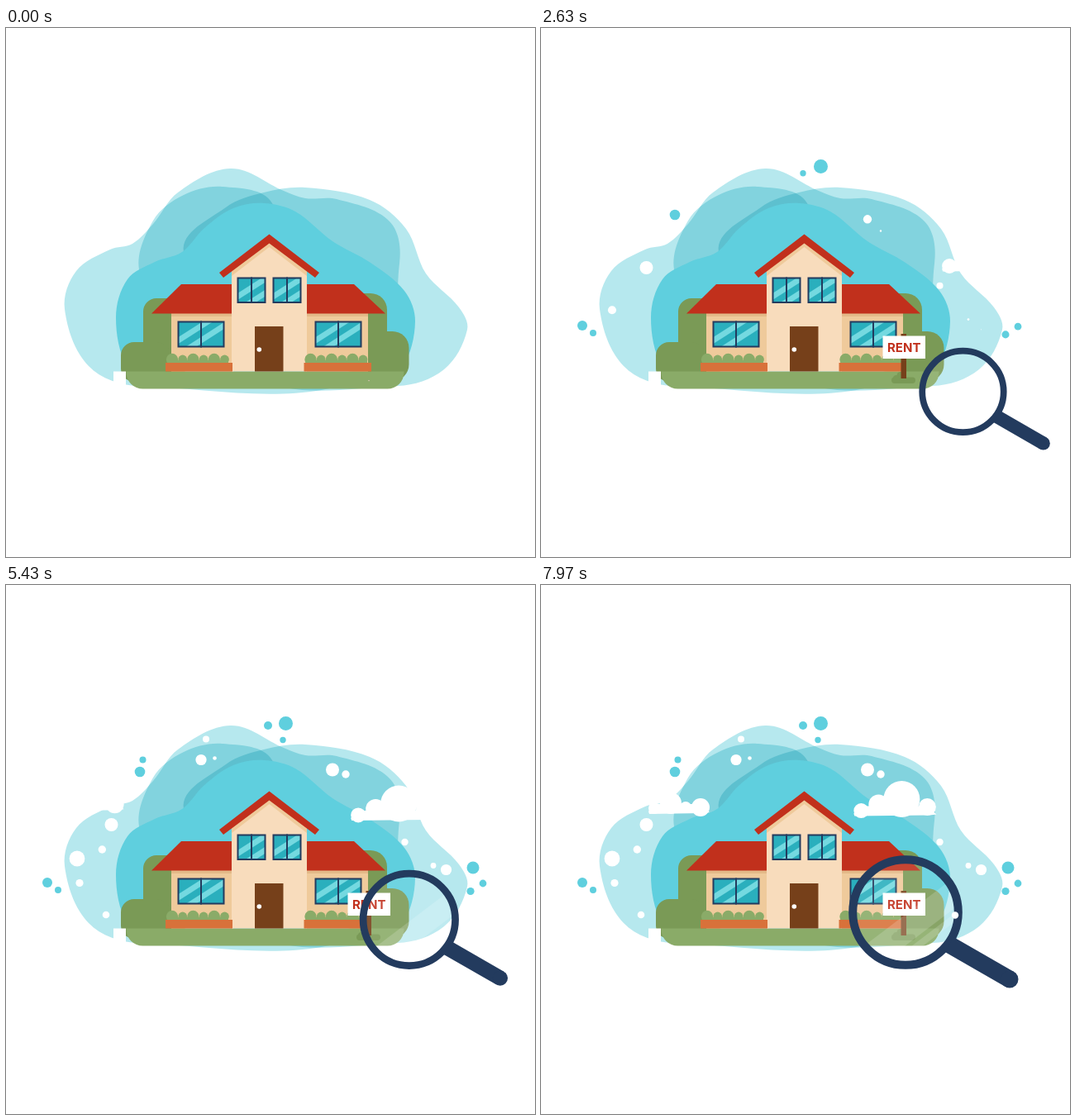
These frames come from a looping animation (640 px wide and 640 px high, 8 s). An HTML page with a canvas:

```html
<!DOCTYPE html>
<html lang="en">
<head>
<meta charset="utf-8">
<title>House for rent</title>
<style>
  html, body { margin: 0; width: 100%; height: 100%; overflow: hidden; background: #fff; }
  canvas { display: block; width: 100%; height: 100%; }
</style>
</head>
<body>
<canvas id="stage" width="640" height="640"></canvas>
<script>
const ctx = document.getElementById('stage').getContext('2d');
const LOOP = 8000;
const CYAN = '#5fcfde', MIST = '#b6e8ee', RED = '#c1301c', NAVY = '#233b5e',
      BUSH = '#7a9a56', GRASS = '#8aab68', WALL = '#f8dcbc', SHADE = '#efca9b',
      BROWN = '#76401a';

const span = (t, from, to) => Math.max(0, Math.min(1, (t - from) / (to - from)));
const smooth = u => u * u * (3 - 2 * u);
const easeOut = u => 1 - (1 - u) ** 3;
const mix = (a, b, u) => a + (b - a) * u;

function rect(color, x, y, x2, y2) {
  ctx.fillStyle = color;
  ctx.fillRect(x, y, x2 - x, y2 - y);
}

function poly(color, ...p) {
  ctx.fillStyle = color;
  ctx.beginPath();
  for (let i = 0; i < p.length; i += 2) ctx.lineTo(p[i], p[i + 1]);
  ctx.fill();
}

function disc(color, x, y, r) {
  ctx.fillStyle = color;
  ctx.beginPath();
  ctx.arc(x, y, r, 0, Math.PI * 2);
  ctx.fill();
}

function pill(color, x, y, w, h, r) {
  ctx.fillStyle = color;
  ctx.beginPath();
  ctx.roundRect(x, y, w, h, r);
  ctx.fill();
}

function clipRect(x, y, w, h) {
  ctx.beginPath();
  ctx.rect(x, y, w, h);
  ctx.clip();
}

// Closed smooth curve; handles are a third of each segment long.
function blob(...p) {
  const n = p.length / 2, path = new Path2D();
  const at = i => [p[2 * ((i + n) % n)], p[2 * ((i + n) % n) + 1]];
  const heading = i => {
    const a = at(i - 1), b = at(i + 1);
    return Math.atan2(b[1] - a[1], b[0] - a[0]);
  };
  path.moveTo(p[0], p[1]);
  for (let i = 0; i < n; i++) {
    const [x, y] = at(i), [x2, y2] = at(i + 1);
    const d = Math.hypot(x2 - x, y2 - y) / 3, a = heading(i), b = heading(i + 1);
    path.bezierCurveTo(x + d * Math.cos(a), y + d * Math.sin(a),
      x2 - d * Math.cos(b), y2 - d * Math.sin(b), x2, y2);
  }
  return path;
}

const mists = [
  blob(71, 340, 85, 294, 126, 268, 153, 261, 178, 237, 208, 199, 272, 170, 336, 197,
    362, 206, 400, 207, 464, 234, 476, 285, 440, 420, 160, 433, 100, 409),
  blob(215, 271, 266, 217, 312, 199, 362, 193, 440, 208, 484, 243, 508, 297, 548, 338,
    558, 365, 530, 413, 474, 433, 300, 420),
  blob(162, 296, 178, 233, 215, 202, 262, 192, 322, 212, 340, 330, 210, 350)
];
const hill = blob(133, 350, 147, 304, 180, 283, 213, 271, 240, 242, 275, 218, 312, 212,
  350, 222, 395, 258, 441, 284, 482, 318, 495, 355, 480, 410, 450, 428, 180, 428, 147, 410);

function backdrop() {
  ctx.globalCompositeOperation = 'multiply';
  ctx.fillStyle = MIST;
  mists.forEach(m => ctx.fill(m));
  ctx.globalCompositeOperation = 'source-over';
  ctx.fillStyle = CYAN;
  ctx.fill(hill);
}

// Puffs are [x, y, radius] from the lower left corner.
function cloud(x, y, width, puffs) {
  const [first, last] = [puffs[0], puffs[puffs.length - 1]];
  ctx.save();
  ctx.translate(x, y);
  puffs.forEach(p => disc('#fff', ...p));
  poly('#fff', 0, -3, first[0], -12, last[0], -12, width, -2, width - 8, -1, 1, 0);
  ctx.restore();
}

function clouds(t) {
  const right = 130 * (1 - smooth(span(t, 600, 8200)));
  const left = -112 * (1 - smooth(span(t, 3200, 7970)));
  cloud(378 + right, 279.5 + right * 0.14, 100,
    [[9, -6.5, 9], [30, -14, 12], [58, -20.5, 22], [89, -11, 10.5]]);
  cloud(130 + left, 277 + left * 0.06, 74,
    [[7, -7, 7], [27, -13, 13], [45, -8, 7], [63, -8, 11]]);
}

function greenery() {
  pill(BUSH, 166, 327, 60, 90, 16);
  pill(BUSH, 139, 380, 60, 48, 16);
  pill(BUSH, 400, 321, 61, 95, 20);
  pill(BUSH, 420, 367, 67.5, 60, 20);
  rect('#fff', 130, 415.5, 145, 436);
  pill(GRASS, 145.5, 415.5, 336, 21, [0, 0, 20, 20]);
}

function pane(x, y, w, h) {
  ctx.save();
  clipRect(x, y, w, h);
  rect('#2aafbd', x, y, x + w, y + h);
  for (const k of [0.62, 1.2]) {
    const low = y + h * k, high = low - w * 0.64;
    poly('#74d9e0', x, low, x + w, high, x + w, high + 8, x, low + 8);
  }
  ctx.restore();
  ctx.strokeStyle = NAVY;
  ctx.lineWidth = 2;
  ctx.strokeRect(x, y, w / 2, h);
  ctx.strokeRect(x + w / 2, y, w / 2, h);
}

function planter(x, x2) {
  ctx.save();
  clipRect(x, 380, x2 - x, 26);
  for (let i = 0; i < 6; i++) disc(GRASS, x + 8 + i * 12.7, 401, i % 2 ? 5.4 : 7.2);
  rect(GRASS, x + 2, 402, x2 - 5, 406);
  ctx.restore();
  rect('#d8713a', x, 405, x2, 415.5);
}

function house() {
  for (const x of [200, 363]) {
    rect(SHADE, x, 340, x + 75, 415.5);
    rect('#e3b988', x, 345, x + 75, 349);
  }
  poly(RED, 212, 310, 275, 310, 275, 345.5, 176, 345.5);
  poly(RED, 363, 310, 421, 310, 459, 345.5, 363, 345.5);
  pane(208.5, 355.5, 55, 30);
  pane(374.5, 355.5, 55, 30);

  poly(WALL, 273, 292, 318.5, 256, 364, 292, 364, 415.5, 273, 415.5);
  poly(SHADE, 273, 290, 318.5, 256, 364, 290, 364, 300, 318.5, 265, 273, 300);
  poly(RED, 318.5, 249.5, 379, 296, 374, 302, 318.5, 260.5, 263, 302, 258, 296);
  pane(280.5, 302.5, 33, 29.5);
  pane(323.5, 302.5, 33, 29.5);
  rect(BROWN, 301, 361, 335.5, 415.5);
  disc('#fff', 306.3, 389, 2.8);
  planter(193, 274);
  planter(360.5, 442);
}

function sign(t) {
  const s = mix(0.03, 1, smooth(span(t, 0, 1100)));
  ctx.save();
  ctx.translate(439, 428);
  ctx.scale(s, s);
  pill(BUSH, -15, -5.5, 29, 7.5, 3.7);
  disc(BUSH, -4, -7.5, 4.5);
  disc(BUSH, -9, -4, 4);
  rect(BROWN, -3.5, -58, 3, -4);
  rect('#fff', -25.5, -55.5, 26, -28);
  ctx.fillStyle = RED;
  ctx.font = '700 15px Inter, sans-serif';
  ctx.textAlign = 'center';
  ctx.fillText('RENT', 0.2, -36.2);
  ctx.restore();
}

// Pops up, drifts to the sign, swells and settles.
function lens(t) {
  const pop = smooth(span(t, 1300, 2800));
  if (!pop) return;
  const lift = 1 - (1 - span(t, 3400, 7100)) ** 2;
  const slide = smooth(span(t, 4100, 7650));
  const swell = 0.38 * span(t, 4100, 7130) ** 2 - 0.18 * smooth(span(t, 7130, 7570));
  const scale = 0.8 * pop + swell;

  ctx.save();
  ctx.translate(mix(mix(537, 509.5, pop), 441, slide), mix(mix(450, 439.6, pop), 396, lift));
  ctx.scale(scale, scale);

  ctx.save();
  ctx.beginPath();
  ctx.arc(0, 0, 62, 0, Math.PI * 2);
  ctx.clip();
  rect('rgba(255,255,255,.1)', -70, -70, 70, 70);
  ctx.rotate(-0.65);
  rect('rgba(255,255,255,.16)', -70, 2, 70, 32);
  rect('rgba(255,255,255,.16)', -70, 37, 70, 45);
  ctx.restore();

  ctx.strokeStyle = NAVY;
  ctx.lineWidth = 10;
  ctx.beginPath();
  ctx.arc(0, 0, 63.8, 0, Math.PI * 2);
  ctx.stroke();
  ctx.lineWidth = 21;
  ctx.beginPath();
  ctx.moveTo(53, 39);
  ctx.lineTo(126, 81);
  ctx.stroke();
  disc(NAVY, 126, 81, 10.5);
  ctx.restore();
}

// Dots [x, y, radius] rise in waves, keyed by the wave's start.
const waves = {
  500: [[50, 360, 6], [338.5, 167.5, 8.5]],
  1420: [[63, 369, 4], [127.5, 290, 8], [162, 226, 6.3], [577, 361, 4.4], [562, 370.5, 4.6],
    [482.5, 311, 4.2]],
  2200: [[317, 170, 5], [395, 223.5, 8], [86, 331, 9.4], [517, 339.5, 3.4], [411, 229, 4.7],
    [532.5, 344.5, 6.6]],
  2660: [[121, 399, 4.3], [252.5, 209.5, 2.3], [335, 187.5, 3.7], [165.5, 211.5, 4],
    [565, 342, 7.5]],
  3330: [[242, 186.5, 4], [89, 360.5, 4.6]],
  3720: [[116.3, 320, 4.7], [236, 211.5, 6.6]],
  6170: [[501, 399.5, 4.2]]
};

function dots(t) {
  for (const [start, wave] of Object.entries(waves)) {
    wave.forEach(([x, y, r], i) => {
      const from = +start + i * 80, p = easeOut(span(t, from, from + 1200));
      const inMist = mists.some(m => ctx.isPointInPath(m, x, y));
      if (p) disc(inMist ? '#fff' : CYAN, x, y + 22 * (1 - p), r * p);
    });
  }
}

function draw(t) {
  rect('#fff', 0, 0, 640, 640);
  backdrop();
  clouds(t);
  greenery();
  house();
  sign(t);
  lens(t);
  dots(t);
}

const begin = performance.now();
function tick() {
  draw((performance.now() - begin) % LOOP);
  requestAnimationFrame(tick);
}
tick();
</script>
</body>
</html>
```
